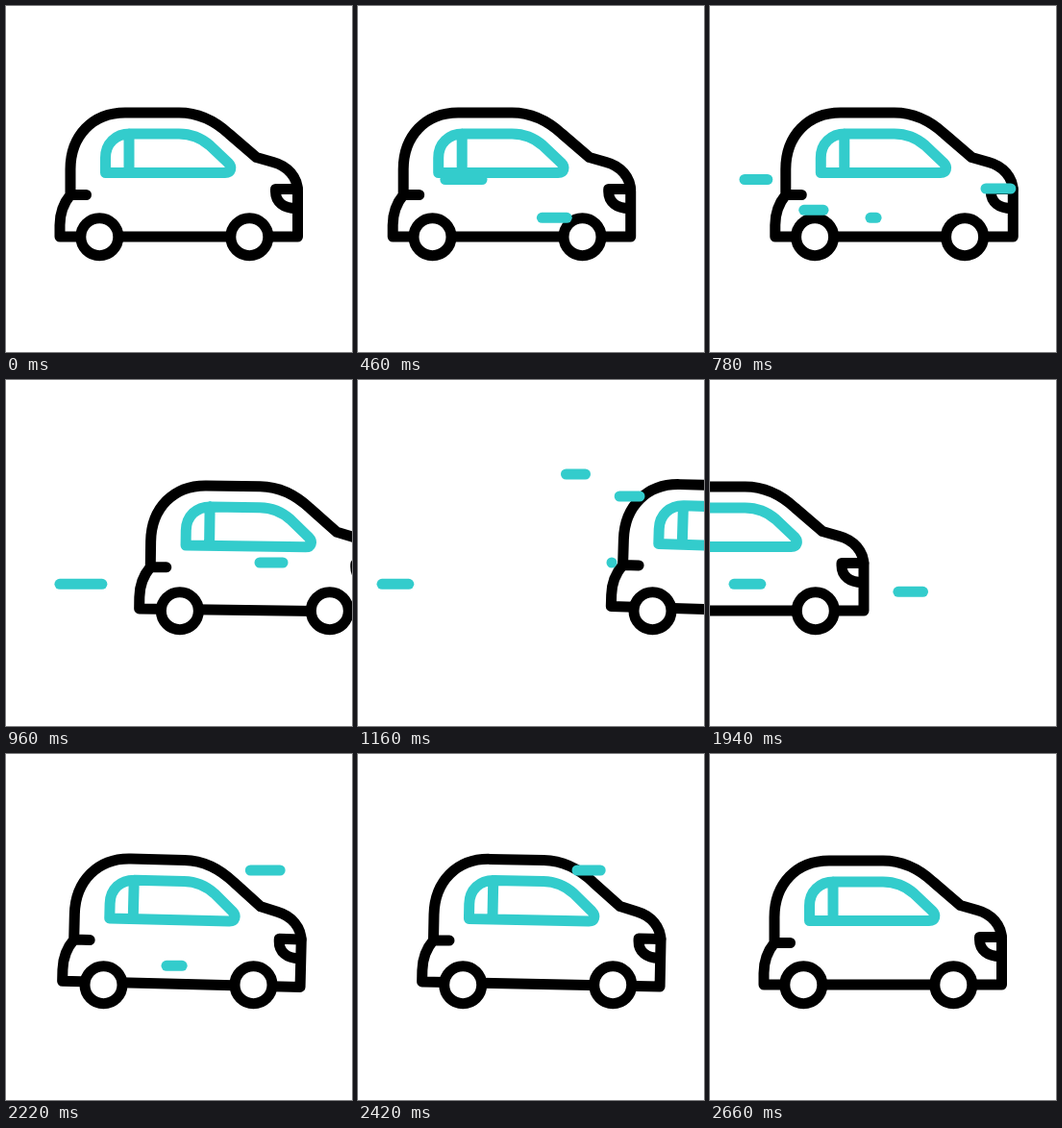
These frames come from a looping animation (360x360 px, 2800 ms). An HTML page:

```html
<!DOCTYPE html>
<html lang="en">
<head>
<meta charset="utf-8">
<title>Driving car</title>
<style>
  html, body { margin: 0; width: 100%; height: 100%; overflow: hidden; background: #fff; }
  svg { display: block; width: 100vw; height: 100vh; }
  svg { fill: none; stroke: #000; stroke-width: 11; stroke-linecap: round; stroke-linejoin: round; }
  .teal { stroke: #33cccc; }
</style>
</head>
<body>
<svg viewBox="0 0 360 360">
  <g id="car">
    <g id="body">
      <path d="M67 196V170C67 135 90 111 124 111H180C203 111 219 121 232 133L260.500 157.500L278 162.500C293 166.500 303.500 178 303.500 193V240H56V228C56 215 60 205 67 196.500H83.500"/>
      <path d="M303.500 190.500H280.500V193C280.500 204 289 210.500 302 210.500"/>
      <path class="teal" d="M103.500 173.500V158C103.500 143 114 133 129 133H180C193 133 204 138 212 145L231 163C236 168 234 173.500 228 173.500ZM128 133V173.500"/>
    </g>
    <g fill="#fff">
      <circle cx="97.300" cy="240.200" r="19.500"/>
      <circle cx="253.300" cy="240.200" r="19.500"/>
    </g>
  </g>
  <g id="wind" class="teal"></g>
</svg>
<script>
const LOOP = 2800;
const $ = id => document.getElementById(id);
const clamp = v => Math.min(1, Math.max(0, v));
const smooth = v => { v = clamp(v); return v * v * (3 - 2 * v); };
const mix = (a, b, v) => a + (b - a) * v;

// Wind lines: y, right end, left end, start times
const lines = [
  [98, 236.5, 191, [985]],
  [121, 293, 228, [1033, 1983]],
  [180.5, 129, 36, [297]],
  [190, 318.5, 264, [550]],
  [212.3, 118, 25, [694, 1474]],
  [220.3, 221.5, 167, [240, 1753]]
].map(([y, right, left, starts]) => {
  const el = document.createElementNS("http://www.w3.org/2000/svg", "path");
  $("wind").append(el);
  return { el, y, right, left, starts };
});

// Pull back, speed away, return from the left, overshoot, settle
function carX(t) {
  if (t < 541) return -23 * smooth((t - 200) / 341);
  if (t < 1500) return -23 + 6.04e-4 * (t - 541) ** 2;
  if (t < 2370) return 13 - 157.5 * ((2370 - t) / 430) ** 2.72;
  return 13 * (1 - smooth((t - 2370) / 285));
}

function tilt(t) {
  if (t < 1500) return 1.7 * smooth((t - 780) / 380);
  return 1.4 * (smooth((t - 1960) / 250) - smooth((t - 2340) / 300));
}

function draw(t) {
  $("car").setAttribute("transform", `translate(${carX(t)})`);
  $("body").setAttribute("transform", `rotate(${tilt(t)} 205 175)`);
  for (const { el, y, right, left, starts } of lines) {
    const start = starts.find(s => t >= s && t < s + 620);
    const age = t - start;
    const head = mix(right, left, clamp(age / 400));
    const tail = mix(right, left, clamp((age - 190) / 395));
    el.setAttribute("d", start === undefined ? "" : `M${head} ${y}H${tail + 0.01}`);
  }
}

const begin = performance.now();
function tick() {
  draw((performance.now() - begin) % LOOP);
  requestAnimationFrame(tick);
}
tick();
</script>
</body>
</html>
```
